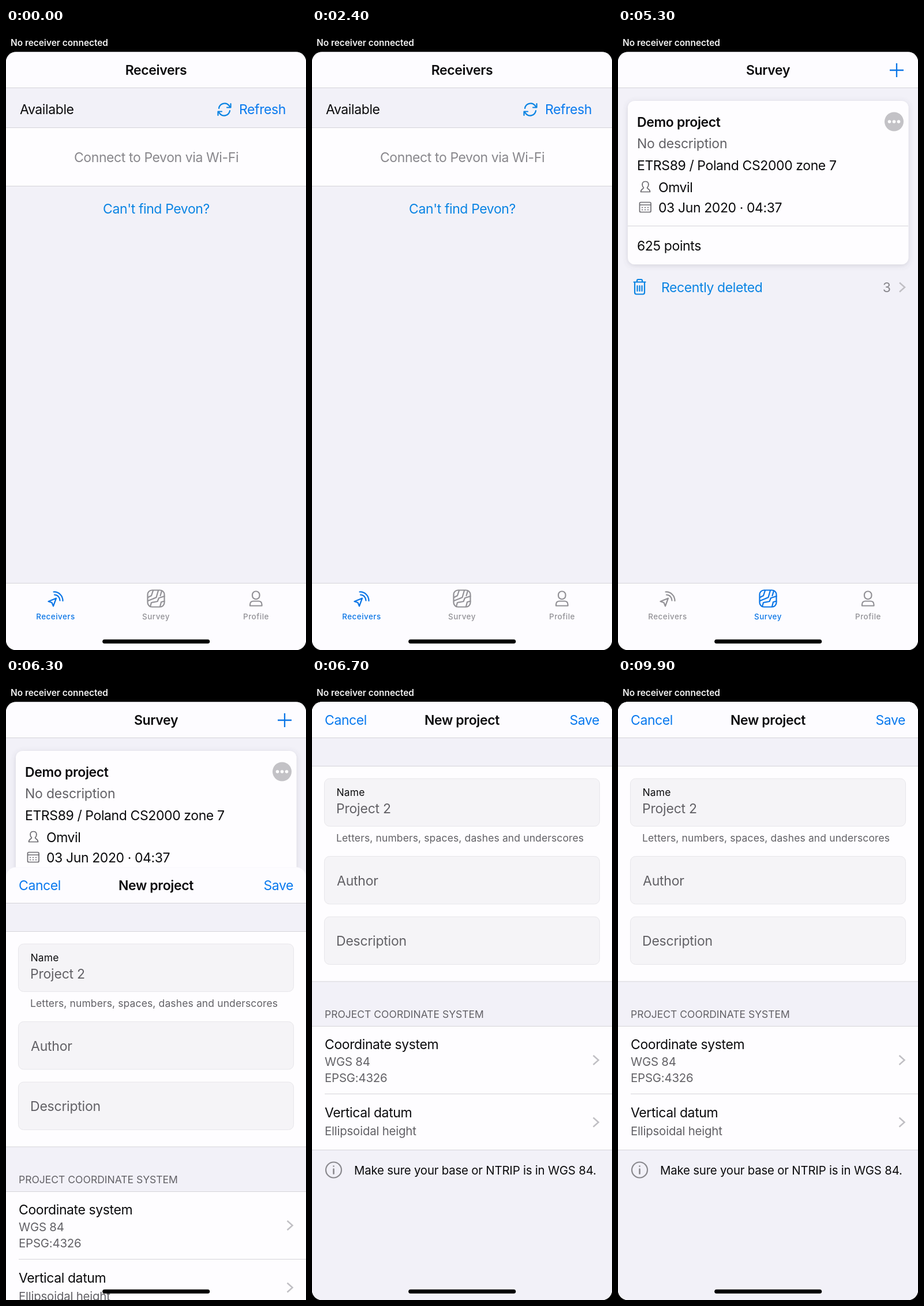
Recreate the animation shown at these times as an HTML page. Size 520 px wide and 1076 px high, loop 10 s.

```html
<!DOCTYPE html>
<html lang="en">
<head>
<meta charset="utf-8">
<title>Survey app: new project</title>
<style>
  html, body { margin: 0; width: 100%; height: 100%; overflow: hidden; background: #000; }
  svg { display: block; width: 520px; height: 1076px; }
  text { font: 23px Inter, "Noto Sans", sans-serif; letter-spacing: -.4px; fill: #0b0b0d; stroke: none; }
  .title { font-weight: 600; letter-spacing: -.35px; }
  .mid { text-anchor: middle; }
  .end { text-anchor: end; }
  .status { font-size: 15.4px; font-weight: 600; letter-spacing: 0; fill: #f4f4f4; }
  .gray { fill: #88878c; }
  .dim { fill: #626166; letter-spacing: -.22px; }
  .small { font-size: 17.5px; letter-spacing: .12px; }
  .caps { letter-spacing: 0; }
  .sub { font-size: 20.4px; letter-spacing: -.2px; }
  .link { fill: #0a84e3; }
  .blue { fill: #0879ee; }
  .bg { fill: #f2f1f8; }
  .bar { fill: #fdfcff; }
  .row { fill: #fefdff; }
  .rule { stroke: #d5d4d9; fill: none; }
  .field { fill: #f5f4f7; stroke: #e7e6ea; }
  .icon { fill: none; stroke-width: 2.2; stroke-linecap: round; stroke-linejoin: round; }
  .chevron { fill: none; stroke: #c0bfc4; stroke-width: 2.5; }
  .tab { color: #929196; stroke: currentColor; }
  .tab.on { color: #0a75e6; }
  .tab text { font-size: 13.4px; font-weight: 500; letter-spacing: .5px; fill: currentColor; text-anchor: middle; }
</style>
</head>
<body>
<svg viewBox="0 0 520 1076">
  <defs>
    <clipPath id="rounded"><rect y="41.5" width="520" height="1034.5" rx="17"/></clipPath>
    <filter id="shadow" x="-10%" y="-10%" width="120%" height="120%">
      <feDropShadow dx="0" dy="2" stdDeviation="5" flood-color="#55546a" flood-opacity=".2"/>
    </filter>
    <path id="chevron" class="chevron" d="M-4.5-8L4.5 0L-4.5 8"/>
    <path id="arrow" d="M369 139a10 10 0 0 1 17.5-5l2 3M389.5 131v6.5h-6.5"/>
  </defs>
  <rect width="520" height="1076"/>
  <text class="status" x="8" y="31">No receiver connected</text>

  <g clip-path="url(#rounded)">
    <rect class="bg" y="41" width="520" height="1035"/>
    <rect class="bar" y="41" width="520" height="63"/>
    <rect class="bar" y="960" width="520" height="116"/>
    <path class="rule" d="M0 103.5H520M0 960.5H520"/>

    <g id="receivers">
      <text class="title mid" x="260" y="81">Receivers</text>
      <text x="24" y="149">Available</text>
      <g class="icon" stroke="#0a84e3">
        <use href="#arrow"/>
        <use href="#arrow" transform="rotate(180 378.5 141)"/>
      </g>
      <text class="blue end" x="485" y="149">Refresh</text>
      <rect class="row" y="173" width="520" height="100"/>
      <path class="rule" d="M0 172.5H520M0 273.5H520"/>
      <text class="gray mid" x="260.5" y="232">Connect to Pevon via Wi-Fi</text>
      <text class="link mid" x="260.5" y="320.5">Can't find Pevon?</text>
    </g>

    <g id="survey" display="none">
      <text class="title mid" x="260" y="81">Survey</text>
      <path d="M471 73H495M483 61V85" stroke="#0a75e6" stroke-width="2.3"/>
      <rect class="row" x="17" y="126" width="486.5" height="283" rx="12" filter="url(#shadow)"/>
      <path class="rule" d="M17 342.5H503"/>
      <text class="title" x="33" y="171">Demo project</text>
      <circle cx="478.5" cy="162" r="16.5" fill="#c3c2c6"/>
      <path d="M470.5 162h0M478.5 162h0M486.5 162h0" stroke="#fff" stroke-width="5.6" stroke-linecap="round"/>
      <text class="dim" x="33" y="207.5">No description</text>
      <text x="33" y="245.5">ETRS89 / Poland CS2000 zone 7</text>
      <g class="icon" style="stroke-width:1.7" stroke="#6d6c71">
        <path d="M44.5 276.5C40.5 272 41.5 265.5 47.5 265.5S54.5 272 50.5 276.5C51 278.5 55.5 278.5 55.5 283.5H39.5C39.5 278.5 44 278.5 44.5 276.5Z"/>
        <rect x="37.5" y="301.5" width="19.5" height="17" rx="2"/>
        <path d="M38 306H57"/>
        <path d="M42 310.5H54M42 314.5H54" stroke-width="2.2" stroke-dasharray="0 5"/>
      </g>
      <text x="70" y="283.5">Omvil</text>
      <text x="70" y="319">03 Jun 2020 · 04:37</text>
      <text x="33" y="384.5">625 points</text>
      <path class="icon" stroke="#0a84e3" d="M27.5 439.5H47.5M33 439V437Q33 435 35 435H40Q42 435 42 437V439M29 440V457.5Q29 460.5 32 460.5H43Q46 460.5 46 457.5V440M33.5 446V455M37.5 446V455M41.5 446V455"/>
      <text class="link" x="75" y="457">Recently deleted</text>
      <text class="gray end" x="472.5" y="457">3</text>
      <use href="#chevron" x="492.5" y="448.5"/>
    </g>

    <g class="tab on" id="receiversTab">
      <path class="icon" d="M87 986.5L73.500 992L79.500 994L82 1000ZM82.5 975.5C91.5 975 98.5 982 98.5 991M84 980.5C89.5 980.5 93.500 985 93.500 990.5"/>
      <text x="86" y="1023">Receivers</text>
    </g>
    <g class="tab" id="surveyTab">
      <rect class="icon" x="245.5" y="972.5" width="29" height="29" rx="7.5"/>
      <path class="icon" d="M255 973L252 982L246 985M264 973L260.5 985L246 991M270 973.5L267.5 982M274.5 983L265 986L262.5 992L252 994L250 1001M274.5 991.5L269 993L267 1001"/>
      <text x="260" y="1023">Survey</text>
    </g>
    <g class="tab">
      <rect class="icon" x="427" y="974.5" width="12.5" height="13.5" rx="6"/>
      <path class="icon" d="M423 999.5V997.5Q423 991.5 429 991.5H437.5Q443.5 991.5 443.5 997.5V999.5Z"/>
      <text x="433.5" y="1023">Profile</text>
    </g>
  </g>

  <g id="sheet" clip-path="url(#rounded)" transform="translate(0 1036)">
    <rect class="bg" y="41" width="520" height="1035"/>
    <rect class="bar" y="41" width="520" height="63"/>
    <rect class="row" y="153" width="520" height="372"/>
    <rect class="row" y="603" width="520" height="214"/>
    <path class="rule" d="M0 103.5H520M0 152.5H520M0 525H520M0 602.5H520M22 719.5H520M0 816.5H520"/>
    <text class="blue" x="22" y="81">Cancel</text>
    <text class="title mid" x="260" y="81">New project</text>
    <text class="blue end" x="498" y="81">Save</text>
    <g class="field">
      <rect x="21.5" y="174" width="477" height="82.5" rx="9"/>
      <rect x="21.5" y="308.5" width="477" height="82.5" rx="9"/>
      <rect x="21.5" y="413" width="477" height="82.5" rx="9"/>
    </g>
    <text class="small" x="42.5" y="204">Name</text>
    <text class="dim" x="42" y="234">Project 2</text>
    <text class="dim small" x="42" y="282.5">Letters, numbers, spaces, dashes and underscores</text>
    <text class="dim" x="43" y="358.5">Author</text>
    <text class="dim" x="42" y="463">Description</text>
    <text class="dim small caps" x="22" y="588">PROJECT COORDINATE SYSTEM</text>
    <text x="22" y="642">Coordinate system</text>
    <text class="dim sub" x="22" y="670.5">WGS 84</text>
    <text class="dim sub" x="22" y="698.5">EPSG:4326</text>
    <use href="#chevron" x="492" y="661"/>
    <text x="22" y="759.5">Vertical datum</text>
    <text class="dim sub" x="22" y="790.5">Ellipsoidal height</text>
    <use href="#chevron" x="492" y="768.5"/>
    <g class="icon" stroke="#8a898e">
      <circle cx="37.5" cy="851" r="13.5"/>
      <path d="M37.5 849.5V857.5M37.5 844.5h0" stroke-width="2.6"/>
    </g>
    <text class="sub" x="73" y="858.5">Make sure your base or NTRIP is in WGS 84.</text>
  </g>

  <rect x="167.2" y="1057.8" width="186" height="7" rx="3.5"/>
</svg>
<script>
  const LOOP = 10000, STEP = 100;
  const SWITCH = 3100, OPEN = 6160;
  const HEIGHT = 1036, STIFFNESS = 18.26;
  const $ = id => document.getElementById(id);

  // Critically damped spring from the bottom edge to rest
  function sheetOffset(ms) {
    const u = Math.max(0, ms - OPEN) / 1000 * STIFFNESS;
    return Math.round(HEIGHT * (1 + u) * Math.exp(-u) - .2);
  }

  function draw(now) {
    const t = Math.floor(now % LOOP / STEP) * STEP;
    const survey = t >= SWITCH;
    $('receivers').setAttribute('display', survey ? 'none' : 'inline');
    $('survey').setAttribute('display', survey ? 'inline' : 'none');
    $('receiversTab').classList.toggle('on', !survey);
    $('surveyTab').classList.toggle('on', survey);
    $('sheet').setAttribute('transform', `translate(0 ${sheetOffset(t)})`);
  }

  const start = performance.now();
  (function tick() {
    draw(performance.now() - start);
    requestAnimationFrame(tick);
  })();
</script>
</body>
</html>
```
